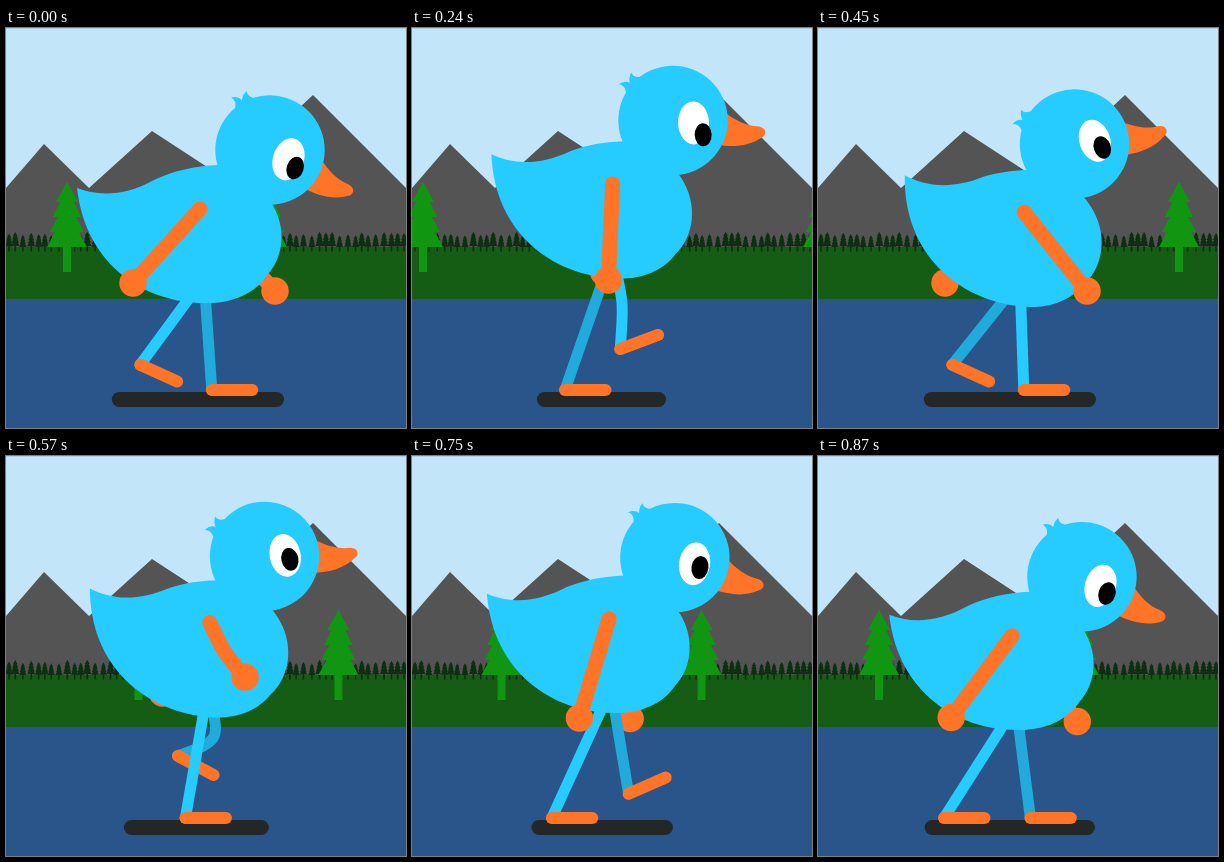
Recreate the animation shown at these times as an HTML page with a canvas. Size 400 px wide and 400 px high, loop 900 ms.

```html
<!DOCTYPE html>
<html lang="en">
<head>
<meta charset="utf-8">
<title>Walking duck</title>
<style>
  html, body { margin: 0; width: 100%; height: 100%; overflow: hidden; }
  canvas { display: block; width: 400px; height: 400px; }
</style>
</head>
<body>
<canvas id="stage" width="400" height="400"></canvas>
<script>
const ctx = document.getElementById('stage').getContext('2d');
const STEP = 30, COUNT = 30, HALF = 15;
const BLUE = '#26cbff', FAR_BLUE = '#21abda', ORANGE = '#ff7426';
const GROUND = 362, FOOT = 40.5, THIGH = 51, SHIN = 46;

const BODY = new Path2D(`M71 160 C92 168 118 169 150 151 C168 143 188 138 212 137
  L240 150 C284 178 282 225 262 246 C248 268 222 276 198 275
  C142 275 80 240 71 160Z`);
const BEAK = new Path2D(`M50 -8 C62 2 72 8 86 9 C94 11 93 18 88 20
  C76 28 60 29 44 26Z`);
const TUFT = new Path2D(`M-46 -24 Q-45 -37 -53 -38 Q-47 -42 -42 -39
  Q-43 -45 -40 -49 Q-38 -43 -28 -45Z`);
const TREE = new Path2D(`M0 0 L11 20 L7 20 L14 35 L9 35 L17 50 L12 50 L20 65
  L4 65 L4 90 L-4 90 L-4 65 L-20 65 L-12 50 L-17 50 L-9 35 L-14 35 L-7 20 L-11 20Z`);

const smooth = x => x * x * (3 - 2 * x);
const wave = (n, peak, period) =>
  smooth(n < peak ? n / peak : (period - n) / (period - peak));

// Arc that is zero at both ends; skew moves its peak toward the start.
const arc = (u, height, skew) =>
  height * Math.sin(Math.PI * u) + skew * Math.sin(2 * Math.PI * u);

function handAt(n) {
  n %= COUNT;
  const u = n % HALF / HALF;
  return n < HALF
    ? [127 + 142 * u - arc(u, 7, 3), 255 + 8 * u - arc(u, 10, 12.6)]
    : [269 - 142 * u + arc(u, 0, 8), 263 - 8 * u - arc(u, 20, 25)];
}

// The foot swings forward for 14 steps, then slides back on the ground.
function footAt(n) {
  const phase = (n + 1) % COUNT;
  if (phase >= 14) {
    return { x: Math.max(126, 219 - 6.6 * (phase - 14)), y: GROUND, pitch: 0 };
  }
  const u = (phase / 14) ** 0.85;
  return {
    x: 126 + 93 * u + arc(u, 12, -9),
    y: GROUND - arc(u, 59.5, 9.3),
    pitch: arc(u, 12, 33) * Math.PI / 180
  };
}

function polygon(color, ...points) {
  ctx.fillStyle = color;
  ctx.beginPath();
  points.forEach(([x, y]) => ctx.lineTo(x, y));
  ctx.fill();
}

function ellipse(color, x, y, rx, ry = rx) {
  ctx.fillStyle = color;
  ctx.beginPath();
  ctx.ellipse(x, y, rx, ry, 0, 0, Math.PI * 2);
  ctx.fill();
}

// A round-ended stroke, pulled toward the joint if there is one.
function limb(color, width, from, to, joint = from) {
  ctx.strokeStyle = color;
  ctx.lineWidth = width;
  ctx.lineCap = 'round';
  ctx.beginPath();
  ctx.moveTo(...from);
  ctx.bezierCurveTo(...joint, ...joint, ...to);
  ctx.stroke();
}

// Point at a distance along the line from a to b, then sideways from it.
function offset([ax, ay], [bx, by], along, side) {
  const d = Math.hypot(bx - ax, by - ay), ux = (bx - ax) / d, uy = (by - ay) / d;
  return [ax + ux * along + uy * side, ay + uy * along - ux * side];
}

function drawTree(x, bottom, scale, color) {
  ctx.save();
  ctx.translate(x, bottom - 90 * scale);
  ctx.scale(scale, scale);
  ctx.fillStyle = color;
  ctx.fill(TREE);
  ctx.restore();
}

function drawScenery(n) {
  ctx.fillStyle = '#c3e5f9';
  ctx.fillRect(0, 0, 400, 400);
  ctx.fillStyle = '#b0cfe2';
  ctx.fillRect(0, 0, 400, 1);
  polygon('#545454', [0, 160], [38, 116], [83, 160], [146, 103], [218, 150],
    [307, 67], [400, 160], [400, 222], [0, 222]);
  ctx.fillStyle = '#155c14';
  ctx.fillRect(0, 219, 400, 52);
  for (let i = 0; i < 56; i++) {
    const size = 0.2 + 0.02 * Math.sin(i * i);
    drawTree(3 + i * 7.2 + Math.sin(i * 5), 223.5, size, '#0c300f');
  }
  ctx.fillStyle = '#29558a';
  ctx.fillRect(0, 271, 400, 129);
  const scroll = 200 * Math.max(0, n - 1) / 28;
  for (let x = 61 - scroll; x < 430; x += 200) drawTree(x, 244, 1, '#119612');
}

function drawLeg(n, hip, color) {
  const { x, y, pitch } = footAt(n), ankle = [x, y];
  const d = Math.hypot(x - hip[0], y - hip[1]);
  const along = (THIGH ** 2 - SHIN ** 2 + d * d) / (2 * d);
  const knee = d < THIGH + SHIN
    ? offset(hip, ankle, along, Math.sqrt(THIGH ** 2 - along ** 2))
    : hip;
  limb(color, 11, hip, ankle, knee);
  limb(ORANGE, 12, ankle, [x + FOOT * Math.cos(pitch), y + FOOT * Math.sin(pitch)]);
}

function drawArm(n, shoulder) {
  const hand = handAt(n), dx = hand[0] - shoulder[0];
  const d = Math.hypot(dx, hand[1] - shoulder[1]);
  const bend = Math.max(0, Math.min(9, 95 - d));
  limb(ORANGE, 15, shoulder, hand,
    offset(shoulder, hand, d / 2, dx < 0 ? bend : -bend / 2));
  ellipse(ORANGE, ...hand, 13.7);
}

function drawHead(n, lean, lift) {
  ctx.save();
  ctx.translate(264 - 7.5 * lean + 1.2 * lift, 122 - 6 * lean - 27.5 * lift);
  ctx.rotate((17.7 - 35.7 * lean) * Math.PI / 180);
  ctx.fillStyle = ORANGE;
  ctx.fill(BEAK);
  ctx.fillStyle = BLUE;
  ctx.fill(TUFT);
  ellipse(BLUE, 0, 0, 54.7);
  ellipse('#fff', 20.4, 3.2, 15.5, 21.5);
  const turn = 2 * Math.PI / COUNT;
  ellipse('#000', 27.4 + 3.2 * Math.cos(turn * (n - 4.2)),
    10.7 + 4.8 * Math.cos(turn * (n - 8.7)), 8.5, 11.5);
  ctx.restore();
}

function draw(n) {
  const lean = wave(n, HALF, COUNT), lift = wave(n % HALF, 7, HALF);
  const shoulder = [194 + 12 * lean, 181 + 3 * lean - 27.8 * lift];
  const hip = [198 + 4 * lean, 250 + 2 * lean - 26.7 * lift];

  drawScenery(n);
  limb('#232727', 15, [113.3 + 20 * lift, 371.5], [270.5 - 25 * lift, 371.5]);
  drawArm(n + HALF, shoulder);
  drawLeg(n + HALF, hip, FAR_BLUE);
  drawLeg(n, hip, BLUE);

  ctx.save();
  ctx.translate(...shoulder);
  ctx.rotate(0.13 * lean);
  ctx.translate(-194, -181);
  ctx.fillStyle = BLUE;
  ctx.fill(BODY);
  ctx.restore();

  drawHead(n, lean, lift);
  drawArm(n, shoulder);
}

const start = performance.now();
function tick() {
  draw(Math.floor((performance.now() - start) / STEP) % COUNT);
  requestAnimationFrame(tick);
}
tick();
</script>
</body>
</html>
```
